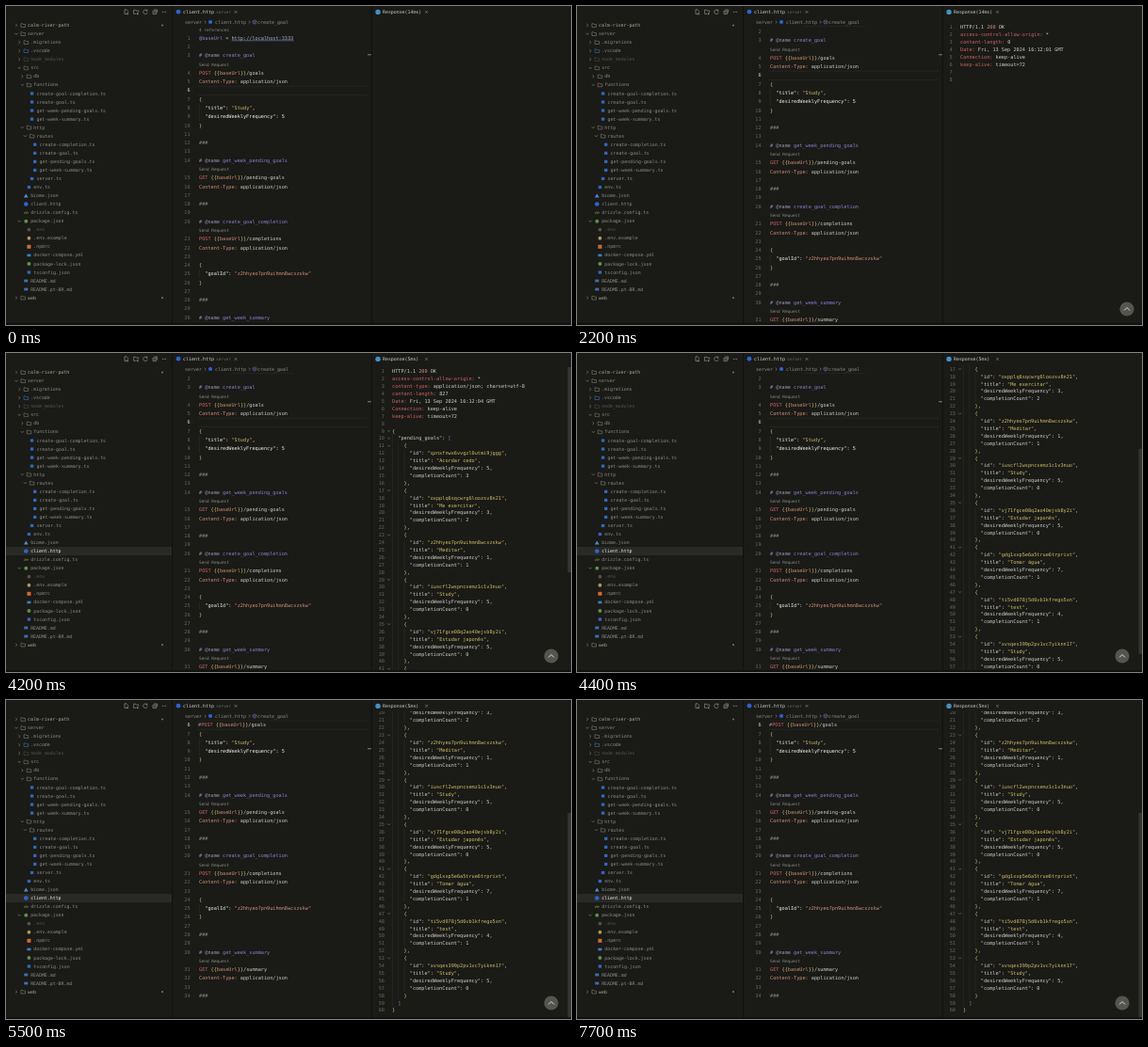
Write an HTML page that moves like this. It is 600 px wide and 339 px high and loops after 8 s.

```html
<!DOCTYPE html>
<html lang="en">
<head>
<meta charset="utf-8">
<title>API client</title>
<style>
  html, body { margin: 0; width: 100%; height: 100%; overflow: hidden; background: #1a1a17; }
  svg { display: block; width: 100vw; height: 100vh; }
  text {
    font-family: "DejaVu Sans Mono", "Noto Sans Mono", monospace;
    white-space: pre;
    text-rendering: geometricPrecision;
  }
</style>
</head>
<body>
<svg id="stage" viewBox="0 0 600 339" preserveAspectRatio="none"></svg>
<script>
const LOOP = 8000;
const NS = 'http://www.w3.org/2000/svg';
const stage = document.getElementById('stage');

// one-letter colour keys used by the "~" markup
const INK = {
  w: '#d0d0ca', g: '#8d8d87', d: '#54544f', r: '#cf6660', o: '#d2937a', y: '#d2c069',
  p: '#8f80cc', c: '#a092b8', b: '#4b83cf', u: '#9fb4d6', n: '#696963', h: '#f0f0ea'
};

function el(parent, tag, attrs = {}) {
  const node = document.createElementNS(NS, tag);
  for (const k in attrs) node.setAttribute(k, attrs[k]);
  parent.appendChild(node);
  return node;
}
const group = (parent, attrs) => el(parent, 'g', attrs);
const rect = (p, x, y, width, height, fill, more) => el(p, 'rect', { x, y, width, height, fill, ...more });
const dot = (p, cx, cy, r, fill) => el(p, 'circle', { cx, cy, r, fill });
const line = (p, d, stroke = INK.g, w = 0.6) =>
  el(p, 'path', { d, fill: 'none', stroke, 'stroke-width': w, 'stroke-linejoin': 'round' });

// "~kText" switches to ink k; y is the middle of the small letters
function write(p, x, y, markup, size = 5.21, more = {}) {
  const node = el(p, 'text', { x, y: y + size * 0.33, 'font-size': size, ...more });
  markup.split('~').slice(1).forEach(part => {
    el(node, 'tspan', { fill: INK[part[0]] }).textContent = part.slice(1);
  });
  return node;
}
const right = { 'text-anchor': 'end' };

function clip(id, x, y, width, height) {
  rect(el(el(stage, 'defs'), 'clipPath', { id }), x, y, width, height);
  return { 'clip-path': `url(#${id})` };
}
const chevDown = (p, x, y, ink) => line(p, `M${x - 1.5} ${y - 0.8}l1.5 1.6l1.5 -1.6`, ink);
const chevRight = (p, x, y, ink) => line(p, `M${x - 0.8} ${y - 1.5}l1.6 1.5l-1.6 1.5`, ink);
const cross = (p, x, y) => line(p, `M${x - 1.4} ${y - 1.4}l2.8 2.8m0 -2.8l-2.8 2.8`);

rect(stage, 0, 0, 600, 339, '#1a1a17');

// ---------- file tree ----------
const tree = group(stage);
const ROW = 9.05;
const focusRow = rect(tree, 0, 206, 176, 9.1, '#292a26');
// depth, fold mark (v open, > closed, - file), icon, name
const FILES = `0 > folder calm-river-path
0 v folder server
1 > folder .migrations
1 > blueFolder .vscode
1 > dimFolder node_modules
1 v greenFolder src
2 > folder db
2 v folder functions
3 - ts create-goal-completion.ts
3 - ts create-goal.ts
3 - ts get-week-pending-goals.ts
3 - ts get-week-summary.ts
2 v folder http
3 v folder routes
4 - ts create-completion.ts
4 - ts create-goal.ts
4 - ts get-pending-goals.ts
4 - ts get-week-summary.ts
3 - ts server.ts
2 - ts env.ts
1 - tri biome.json
1 - globe client.http
1 - slash drizzle.config.ts
1 v green package.json
2 - dim .env
2 - yellow .env.example
2 - orange .npmrc
2 - whale docker-compose.yml
2 - green package-lock.json
2 - ts tsconfig.json
1 - md README.md
1 - md README.pt-BR.md
0 > folder web`.split('\n').map(s => s.split(' '));

function folder(x, y, ink) {
  line(tree, `M${x - 2.2} ${y - 1.8}h1.6l.7 .8h2.3v2.9h-4.6z`, ink, 0.55);
}
const ICONS = {
  folder: (x, y) => folder(x, y, '#8b8b83'),
  blueFolder: (x, y) => folder(x, y, '#3f7fc0'),
  dimFolder: (x, y) => folder(x, y, '#465539'),
  greenFolder: (x, y) => folder(x, y, '#6c9150'),
  ts: (x, y) => rect(tree, x - 1.7, y - 1.5, 3.4, 3.2, '#3268bd'),
  tri: (x, y) => el(tree, 'path', { d: `M${x} ${y - 2}l2.4 4h-4.8z`, fill: '#5289c9' }),
  globe: (x, y) => dot(tree, x, y, 2.3, '#2f63d0'),
  slash: (x, y) => line(tree, `M${x - 2} ${y + 1.2}l1.2 -2.2m.6 2.2l1.2 -2.2m.4 2l.8 -1.6`, '#85a84a', 0.7),
  green: (x, y) => dot(tree, x, y, 2, '#5f8f4e'),
  dim: (x, y) => dot(tree, x, y, 1.9, '#54524a'),
  yellow: (x, y) => dot(tree, x, y, 1.9, '#a79b60'),
  orange: (x, y) => rect(tree, x - 2, y - 2, 4, 4, '#d06a34'),
  whale: (x, y) => rect(tree, x - 2, y - 1.2, 4, 2.6, '#3d7fc0'),
  md: (x, y) => rect(tree, x - 2, y - 1.4, 4, 2.8, '#3f70b4')
};
let focusName;
FILES.forEach(([depth, fold, icon, name], i) => {
  const y = 20.5 + i * ROW, x = 23 + depth * 3.15;
  if (fold === 'v') chevDown(tree, x - 12, y);
  if (fold === '>') chevRight(tree, x - 12, y);
  ICONS[icon](x - 4.9, y);
  const ink = /^(node_modules|\.env)$/.test(name) ? 'd' : 'g';
  const label = write(tree, x, y, `~${ink}${name}`, 4.9);
  if (depth === '0' && fold === '>') {
    label.firstChild.setAttribute('fill', '#a9ad95');
    dot(tree, 166, y, 1.1, '#65745a');
  }
  if (icon === 'globe') focusName = label.firstChild;
});

// toolbar
line(tree, 'M128 3.8h-2v4.8h2.2m-.2 -4.8l1.6 1.6v1.2m-.6 .4v2.4m-1.2 -1.2h2.4', '#a2a29b');
line(tree, 'M138 8.4h-2.4v-4.2h1.8l.7 .8h2.6v1.6m-1 .4v2.4m-1.2 -1.2h2.4', '#a2a29b');
line(tree, 'M149.8 4.8a2.3 2.3 0 1 0 .5 1.9m-.3 -3v1.5h-1.6', '#a2a29b');
line(tree, 'M156 5.2h3.4v3.4h-3.4zm1.2 -1.2h3.4v3.4m-3.9 -.5h2', '#a2a29b');
[166.3, 168, 169.7].forEach(x => dot(tree, x, 6.2, 0.5, '#a2a29b'));

// ---------- request editor ----------
const LINE = 9.28;
const editClip = clip('edit', 177, 21.5, 211, 316);
const editor = group(group(stage, editClip));
const CODE = `lens 4 references
~p@baseUrl ~w= ~uhttp://localhost:3333

~c# @name ~pcreate_goal
lens Send Request
~rPOST ~y{{~obaseUrl~y}}~w/goals
~oContent-Type: ~wapplication/json

~y{
~h  "title": ~y"Study"~h,
~h  "desiredWeeklyFrequency": 5
~y}

~g###

~c# @name ~pget_week_pending_goals
lens Send Request
~rGET ~y{{~obaseUrl~y}}~w/pending-goals
~oContent-Type: ~wapplication/json

~g###

~c# @name ~pcreate_goal_completion
lens Send Request
~rPOST ~y{{~obaseUrl~y}}~w/completions
~oContent-Type: ~wapplication/json

~y{
~h  "goalId": ~o"z2hhyeo7pn9uihmn8wcxzskw"
~y}

~g###

~c# @name ~pget_week_summary
lens Send Request
~rGET ~y{{~obaseUrl~y}}~w/summary
~oContent-Type: ~wapplication/json

~g###`.split('\n');

let num = 0;
CODE.forEach((s, i) => {
  const y = 24.8 + i * LINE;
  if (s.startsWith('lens')) return write(editor, 205, y + 0.4, '~g' + s.slice(5), 4.43);
  num++;
  const current = num === 6;
  if (current) line(editor, `M204 ${y - 4.6}h180m0 ${LINE}h-180`, '#2c2c28', 0.6);
  write(editor, 195.6, y, `~${current ? 'w' : 'n'}${num}`, 5.21, right);
  if (s.startsWith('~h')) line(editor, `M205.3 ${y - 4.6}v${LINE}`, '#33332f', 0.5);
  if (s) write(editor, 205, y, s);
});
line(editor, `M239.7 ${24.8 + LINE + 2.7}h66`, INK.u, 0.45);

const pinned = write(stage, 204, 26.6, '~c#~rPOST ~y{{~obaseUrl~y}}~w/goals');

dot(stage, 183, 6.2, 2.4, '#2f63d0');
write(stage, 188, 6.4, '~wclient.http', 4.98);
write(stage, 223, 6.6, '~nserver', 4.4);
cross(stage, 244, 6.4);
dot(stage, 217, 17, 2.1, '#2f63d0');
line(stage, 'M264 14.8l2 1.1v2.2l-2 1.1l-2 -1.1v-2.2zm-2 1.1l2 1.1l2 -1.1m-2 1.1v2.2', '#8379b4', 0.5);
write(stage, 190, 17, '~gserver', 4.98);
write(stage, 222, 17, '~gclient.http', 4.98);
write(stage, 267, 17, '~gcreate_goal', 4.98);
chevRight(stage, 211.5, 17.2);
chevRight(stage, 258.5, 17.2);
rect(stage, 384, 51.3, 4.5, 1, '#85857e');

// ---------- response ----------
const STEP = 7.9;
const respClip = clip('resp', 389, 12, 211, 325.5);
const short = group(stage, respClip);
const long = group(group(stage, respClip));
const headers = (sec, extra) => [
  '~wHTTP/1.1 ~o200 ~wOK',
  '~raccess-control-allow-origin: ~w*',
  ...extra,
  `~rDate: ~wFri, 13 Sep 2024 16:12:${sec} GMT`,
  '~rConnection: ~wkeep-alive',
  '~rkeep-alive: ~wtimeout=72'
];
const GOALS = [
  ['qznxfnwx6vvgzl0utmi9jggg', 'Acordar cedo', 5, 3],
  ['oxpplq6sqcwrg6loozsv8n21', 'Me exercitar', 3, 2],
  ['z2hhyeo7pn9uihmn8wcxzskw', 'Meditar', 1, 1],
  ['iuscfl2wspncsemz1c1v3nuo', 'Study', 5, 0],
  ['vj71fgce08q2ao40ejsb8y2i', 'Estudar japonês', 5, 0],
  ['gdg1xxp5e6a5true6trprixt', 'Tomar água', 7, 1],
  ['ti5vd078j5d6vb1kfrego5xn', 'test', 4, 1],
  ['xvsqes399p2pv1vc7yiknn17', 'Study', 5, 0]
];
const pad = '      ';
const body = ['', '~y{', '~w  "pending_goals": ~p['];
GOALS.forEach(([id, title, freq, count], i) => body.push(
  '~y    {',
  `~w${pad}"id": ~y"${id}"~w,`,
  `~w${pad}"title": ~y"${title}"~w,`,
  `~w${pad}"desiredWeeklyFrequency": ~w${freq},`,
  `~w${pad}"completionCount": ~w${count}`,
  i < GOALS.length - 1 ? '~y    }~w,' : '~y    }'
));
body.push('~p  ]', '~y}');

function listing(p, rows, x, numX, folds) {
  rows.forEach((s, i) => {
    const y = 22.6 + i * STEP;
    write(p, numX, y, '~n' + (i + 1), 5.21, right);
    if (folds && /[{[]$/.test(s)) chevDown(p, 406.6, y, '#77776f');
    if (s) write(p, x, y, s);
  });
}
listing(short, [...headers('01', ['~rcontent-length: ~w0']), '', ''], 407, 398.6, false);
listing(long, [
  ...headers('04', ['~rcontent-type: ~wapplication/json; charset=utf-8', '~rcontent-length: ~w827']),
  ...body
], 410, 402, true);

// indent guides: x, first line, last line
const guide = (x, a, b) => line(long, `M${x} ${22.6 + (a - 1.5) * STEP}V${22.6 + (b - 0.5) * STEP}`, '#33332f', 0.45);
guide(410.4, 10, 59);
guide(416.7, 11, 58);
GOALS.forEach((_, i) => guide(423, 12 + 6 * i, 15 + 6 * i));

const slider = rect(stage, 596.5, 13, 3.5, 218, '#343430');
const toTop = group(stage);
dot(toTop, 0, 0, 7.6, '#55554f');
line(toTop, 'M-3 1.5l3 -3l3 3', '#dcdcd6', 1);

dot(stage, 395, 6.4, 2.7, '#3f93c4');
const title = write(stage, 400, 6.5, '~wResponse', 4.9).firstChild;
cross(stage, 446.5, 6.4);

// pane borders
rect(stage, 176, 0, 1, 339, '#10100e');
rect(stage, 387.8, 0, 1, 339, '#10100e');
rect(stage, 0, 337.2, 600, 1.8, '#10100e');

// ---------- time ----------
const show = (node, on) => node.setAttribute('visibility', on ? 'visible' : 'hidden');
const shift = (node, x, y) => node.setAttribute('transform', `translate(${x} ${y})`);
// value of the latest [time, value] pair that has been reached
const at = (t, steps) => steps.reduce((v, [when, next]) => (t >= when ? next : v), 0);

function draw(t) {
  const loaded = t >= 3400;
  const focused = t >= 3200;
  show(focusRow, focused);
  focusName.setAttribute('fill', focused ? INK.h : INK.g);
  title.textContent = t >= 3300 ? 'Response(5ms)' : 'Response(14ms)';

  shift(editor, 0, -at(t, [[1900, 16], [5400, 44.6], [5500, 63.2]]));
  show(pinned, t >= 5500);

  show(short, t >= 100 && !loaded);
  show(long, loaded);
  const scroll = at(t, [[4200, 3], [4300, 58], [4400, 132], [4500, 159]]);
  shift(long, 0, -scroll);
  show(slider, loaded);
  slider.setAttribute('y', 13 + scroll * 0.672);

  show(toTop, t >= 100);
  toTop.setAttribute('opacity', t < 200 ? 0.5 : 1);
  shift(toTop, loaded ? 579 : 584, 322);
}

const start = performance.now();
function tick() {
  draw((performance.now() - start) % LOOP);
  requestAnimationFrame(tick);
}
tick();
</script>
</body>
</html>
```
